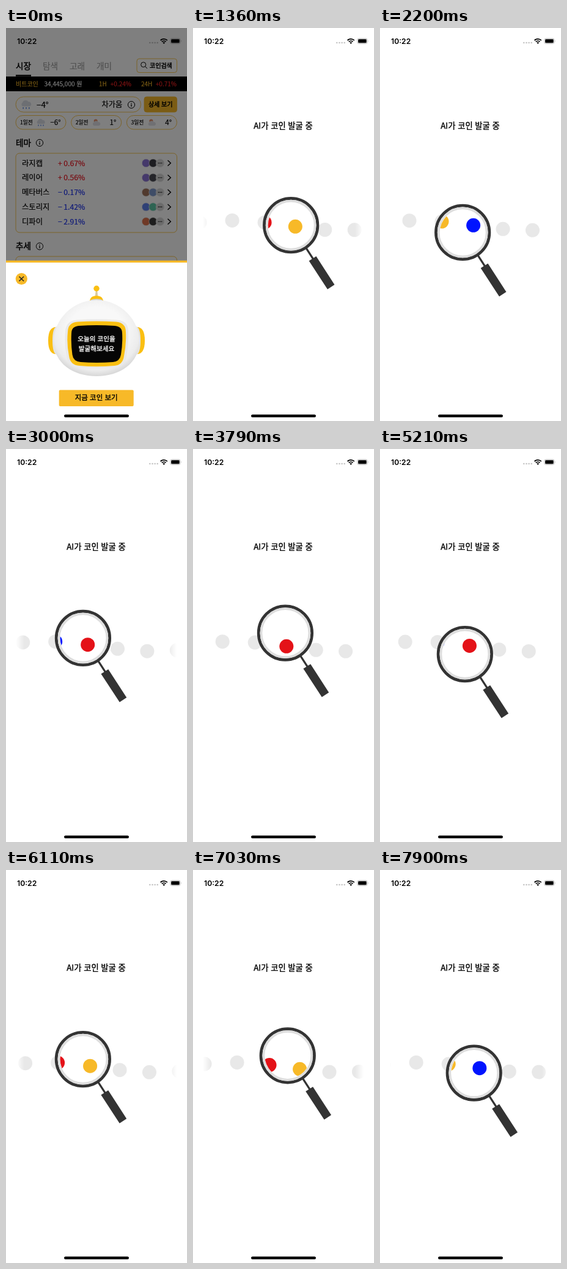
An HTML page for the animation above (8 s loop, 296 by 640 pixels).

```html
<!DOCTYPE html>
<html lang="ko">
<head>
<meta charset="utf-8">
<style>
html, body { margin: 0; width: 100%; height: 100%; overflow: hidden; background: #fff; }
svg { display: block; width: 296px; height: 640px; font-family: "Noto Sans CJK KR", "Noto Sans CJK", "Noto Sans CJK JP", sans-serif; font-weight: 500; }
.clock { font: 600 12.2px Inter, sans-serif; }
.medium { stroke: #000; stroke-width: .35px; }
</style>
</head>
<body>
<svg viewBox="0 0 296 640" width="296" height="640">
  <defs>
    <linearGradient id="fade" gradientUnits="userSpaceOnUse" x1="0" y1="0" x2="296" y2="0">
      <stop offset=".054" stop-color="#000"/>
      <stop offset=".101" stop-color="#fff"/>
      <stop offset=".895" stop-color="#fff"/>
      <stop offset=".943" stop-color="#000"/>
    </linearGradient>
    <mask id="edges" maskUnits="userSpaceOnUse" x="0" y="280" width="296" height="80">
      <rect y="280" width="296" height="80" fill="url(#fade)"/>
    </mask>
    <clipPath id="lens"><circle id="lensHole" r="37.4"/></clipPath>
    <radialGradient id="shell" cx=".5" cy=".42" r=".6">
      <stop offset=".55" stop-color="#f8f8f8"/>
      <stop offset=".84" stop-color="#ececec"/>
      <stop offset="1" stop-color="#d2d2d2"/>
    </radialGradient>
    <g id="status">
      <text class="clock" x="18" y="25.7">10:22</text>
      <g fill="#c4c4c4">
        <circle cx="235.3" cy="24" r="1.3"/><circle cx="239.5" cy="24" r="1.3"/>
        <circle cx="243.6" cy="24" r="1.3"/><circle cx="247.7" cy="24" r="1.3"/>
      </g>
      <path d="M252.6 20.2a8 8 0 0 1 11.2 0M254.8 22.4a5 5 0 0 1 6.8 0" fill="none" stroke="#000" stroke-width="1.8"/>
      <path d="M258.2 26l-2-2.2a3 3 0 0 1 4 0z"/>
      <rect x="268.9" y="17.1" width="16" height="8.4" rx="2.4" fill="none" stroke="#aaa" stroke-width=".8"/>
      <rect x="270.1" y="18.3" width="13.6" height="6" rx="1.4"/>
      <path d="M285.9 19.8q1.4 1.5 0 3z" fill="#aaa"/>
    </g>
    <g id="info">
      <circle r="5.6" fill="none" stroke="#000"/>
      <path d="M0-.8V3M0-3v1.2" stroke="#000" stroke-width="1.3"/>
    </g>
    <g id="rain">
      <path d="M-5 2a3 3 0 0 1 0-5a4.500 4.500 0 0 1 8-1a3.200 3.200 0 0 1 2 6z" fill="#dcdfe8"/>
      <path d="M-4 3.500v2M0 3.500v2M4 3.500v2" stroke="#4f7fe0" stroke-width="1.300"/>
    </g>
    <g id="cloud">
      <circle cx="-1" cy="-2.500" r="3" fill="#e8926a"/>
      <path d="M-4 5a3 3 0 0 1 0-5.500a4 4 0 0 1 7-.5a3 3 0 0 1 1 6z" fill="#e2e2e8"/>
    </g>
  </defs>

  <g id="home">
    <rect width="296" height="640" fill="#fff"/>
    <g id="market"></g>
    <use href="#status"/>
    <rect width="296" height="380" opacity=".5"/>
    <g id="sheet">
      <rect y="378.7" width="296" height="262" fill="#f7b928"/>
      <rect y="382" width="296" height="258" fill="#fff"/>
      <circle cx="25.3" cy="408.5" r="9.6" fill="#f7b928"/>
      <path d="M21.5 404.7l7.6 7.6m0-7.6l-7.6 7.6" stroke="#222" stroke-width="1.5"/>
      <path d="M146.7 428h2.6l1 9h-4.600z" fill="#d9c9a0"/>
      <circle cx="148" cy="424.300" r="4.700" fill="#fabf12"/>
      <path d="M137 446q0-10 11-10t11 10z" fill="#fabf12"/>
      <path d="M138 443q10-4 20 0v5h-20z" fill="#d4d4d4"/>
      <path id="ear" d="M82 487q-13 0-13 22t13 22z" fill="#fabf12"/>
      <path d="M83 486q-7 2-7 23t7 23z" fill="#e4e4e4"/>
      <g transform="matrix(-1 0 0 1 296 0)">
        <use href="#ear"/>
        <path d="M83 486q-7 2-7 23t7 23z" fill="#e4e4e4"/>
      </g>
      <path d="M148 443C188 443 218 476 218 510C218 546 186 567 148 567C110 567 78 546 78 510C78 476 108 443 148 443z" fill="url(#shell)"/>
      <path d="M115 475.500Q148 473 182 475.500Q200 477 200 494Q201 514 197 535Q194 552 179 553Q148 556 118 553Q102 552 99 535Q95 514 97 494Q98 477 115 475.500z" fill="#e9e9e9"/>
      <path d="M117 478.500Q148 476.500 180 478.500Q196 480 196 495Q197 514 193 534Q191 549 177 550Q148 552.500 120 550Q105 549 103 534Q99 514 101 495Q101 480 117 478.500z" fill="#fabf12"/>
      <path d="M119 485Q148 483 178 485Q190 486 190 497Q191 514 188 532Q186 543 175 544Q148 546 122 544Q110 543 108.500 532Q106 514 107 497Q107 486 119 485z" fill="#050505"/>
      <g fill="#fff" font-size="10.6" stroke="#fff" stroke-width=".3" text-anchor="middle">
        <text x="148" y="510">오늘의 코인을</text>
        <text x="148" y="525.5">발굴해보세요</text>
      </g>
      <rect x="86.7" y="589.5" width="122" height="26.5" rx="2" fill="#f7b928"/>
      <text class="medium" x="147.7" y="606.3" font-size="11.5" text-anchor="middle">지금 코인 보기</text>
    </g>
  </g>

  <g id="search">
    <g id="page">
      <rect width="296" height="640" fill="#fff"/>
      <text class="medium" x="147.5" y="164.3" font-size="13.3" text-anchor="middle">AI가 코인 발굴 중</text>
      <g id="greys" mask="url(#edges)"></g>
      <g id="glass">
        <path d="M24 36L37 56" stroke="#333" stroke-width="3.2"/>
        <path d="M29.5 58.2L41.3 50.7L71.3 96.8L59.8 104.3z" fill="#333"/>
        <circle r="43.7" fill="#fff" stroke="#333" stroke-width="4.8"/>
        <circle r="39.5" fill="none" stroke="#dedede" stroke-width="3.8"/>
      </g>
      <g clip-path="url(#lens)"><g id="colours"></g></g>
    </g>
    <use href="#status"/>
  </g>
  <rect x="95" y="629.5" width="106" height="4.5" rx="2.25"/>
</svg>
<script>
const NS = 'http://www.w3.org/2000/svg';
const $ = id => document.getElementById(id);
const GOLD = '#f7b928', RED = '#e41218', BLUE = '#0014ff', LOOP = 8000;

function add(parent, tag, attrs, text) {
  const el = document.createElementNS(NS, tag);
  for (const k in attrs) el.setAttribute(k, attrs[k]);
  if (text) el.textContent = text;
  parent.appendChild(el);
  return el;
}

function buildMarket() {
  const m = $('market');
  const label = (x, y, size, s, fill = '#000', more = {}) =>
    add(m, 'text', { x, y, 'font-size': size, fill, stroke: fill, 'stroke-width': .2, ...more }, s);
  const box = (x, y, width, height, rx, fill = 'none') =>
    add(m, 'rect', { x, y, width, height, rx, fill, stroke: GOLD, 'stroke-width': .8 });
  const icon = (id, x, y, scale = 1) =>
    add(m, 'use', { href: '#' + id, transform: `translate(${x} ${y}) scale(${scale})` });
  const line = (d, w = 1.4) => add(m, 'path', { d, fill: 'none', stroke: '#000', 'stroke-width': w });
  const heavy = { 'stroke-width': .45 }, end = { 'text-anchor': 'end' };

  ['시장', '탐색', '고래', '개미'].forEach((s, i) =>
    label(16 + 44 * i, 66.5, 13.6, s, i ? '#a2a2a2' : '#000', i ? {} : heavy));
  line('M16 77.5h25', 2.5);
  box(214, 50, 65.5, 22.5, 4);
  add(m, 'circle', { cx: 224.7, cy: 59.7, r: 4, fill: 'none', stroke: '#000' });
  line('M227.6 62.6l3.4 3.4', 1);
  label(235, 64.5, 10, '코인검색', '#000', heavy);

  add(m, 'rect', { y: 79, width: 296, height: 24 });
  label(16, 94.7, 10, '비트코인', GOLD);
  label(62.5, 94.7, 10, '34,445,000 원', '#fff');
  label(152, 94.7, 10, '1H', GOLD);
  label(205, 94.7, 10, '+0.24%', '#ff2525', end);
  label(221, 94.7, 10, '24H', GOLD);
  label(279, 94.7, 10, '+0.71%', '#ff2525', end);

  box(16, 112, 204.5, 25, 12.5);
  icon('rain', 33, 125, 1.2);
  label(50, 129.5, 13.3, '−4°');
  label(156.5, 129.3, 12.2, '차가움');
  icon('info', 205, 125);
  box(226, 112, 53.5, 25, 4, GOLD);
  label(252.7, 128.3, 10, '상세 보기', '#000', { ...heavy, 'text-anchor': 'middle' });

  ['−6°', '1°', '4°'].forEach((s, i) => {
    const x = 16 + 90.7 * i;
    box(x, 142.5, 82, 22.5, 11.2);
    label(x + 7, 157, 8.7, `${i + 1}일전`);
    icon(i ? 'cloud' : 'rain', x + 41, 154);
    label(x + 73.5, 158, 11.5, s, '#000', end);
  });

  label(16, 191.5, 13.6, '테마', '#000', heavy);
  icon('info', 55, 187);
  box(16, 204, 263.5, 129, 6);
  const rows = [
    ['라지캡', '+', '0.67%', '#8b72d8', '#3a3a42'],
    ['레이어', '+', '0.56%', '#8b72d8', '#4b4b54'],
    ['메타버스', '−', '0.17%', '#a4755c', '#7f9bd0'],
    ['스토리지', '−', '1.42%', '#5f84ee', '#5cc9a8'],
    ['디파이', '−', '2.91%', '#e0724c', '#3b3b3b']
  ];
  rows.forEach(([name, sign, value, c1, c2], i) => {
    const y = 220 + 23.8 * i, tone = sign === '+' ? '#f01420' : '#1a30f0';
    label(26, y + 4.5, 12.3, name);
    label(85, y + 4.5, 12.2, sign, tone);
    label(94.3, y + 4.5, 12.2, value, tone);
    [c1, c2, '#d8d8d8'].forEach((fill, k) =>
      add(m, 'circle', { cx: 229 + 11.5 * k, cy: y, r: 6.7, fill, stroke: '#eee', 'stroke-width': .8 }));
    [-2.5, 0, 2.5].forEach(d => add(m, 'circle', { cx: 252 + d, cy: y, r: .8 }));
    line(`M264.5 ${y - 4.5}l4.8 4.5l-4.8 4.5`);
  });

  label(16, 360, 13.6, '추세', '#000', heavy);
  icon('info', 55, 355.5);
  box(16, 372, 263.5, 60, 6);
}

// The coin row runs at a steady rate and restarts: [from ms, anchor ms, red slot]
const RATE = 2.02 / 1000;
const runs = [[0, 1360, 2], [3240, 3790, 2.7], [6790, 7030, 2.15]];
const tones = [RED, GOLD, BLUE];
const mod = (a, n) => ((a % n) + n) % n;

const slotX = u => 11 + 53 * u - 4.6 * Math.max(0, u - 2.4);
const waveY = x => 321.4 - 8 * Math.cos((x - 64) / 179 * Math.PI);

const coins = Array.from({ length: 9 }, () => ({
  grey: add($('greys'), 'circle', { r: 11.5, fill: '#e8e8e8' }),
  tint: add($('colours'), 'circle', { r: 11.5 })
}));

function draw(t) {
  const searching = t >= 960;
  $('home').style.display = t < 1150 ? '' : 'none';
  $('search').style.display = searching ? '' : 'none';
  if (!searching) return;
  $('page').setAttribute('transform', `translate(${t < 1150 ? 11 : 0} 0)`);

  const a = (16.2 + (t - 1360) * 0.1156) * Math.PI / 180;
  const place = `translate(${142.5 + 18.4 * Math.cos(a)} ${316 + 18.4 * Math.sin(a)})`;
  $('glass').setAttribute('transform', place);
  $('lensHole').setAttribute('transform', place);

  const [, anchor, slot] = runs.filter(r => t >= r[0]).pop();
  const red = mod(slot + (t - anchor) * RATE, 3);
  coins.forEach(({ grey, tint }, i) => {
    const n = i - 3, x = slotX(red + n), y = waveY(x);
    for (const c of [grey, tint]) {
      c.setAttribute('cx', x);
      c.setAttribute('cy', y);
    }
    tint.setAttribute('fill', tones[mod(n, 3)]);
  });
}

buildMarket();
const start = performance.now();
function tick() {
  draw((performance.now() - start) % LOOP);
  requestAnimationFrame(tick);
}
draw(0);
requestAnimationFrame(tick);
</script>
</body>
</html>
```
